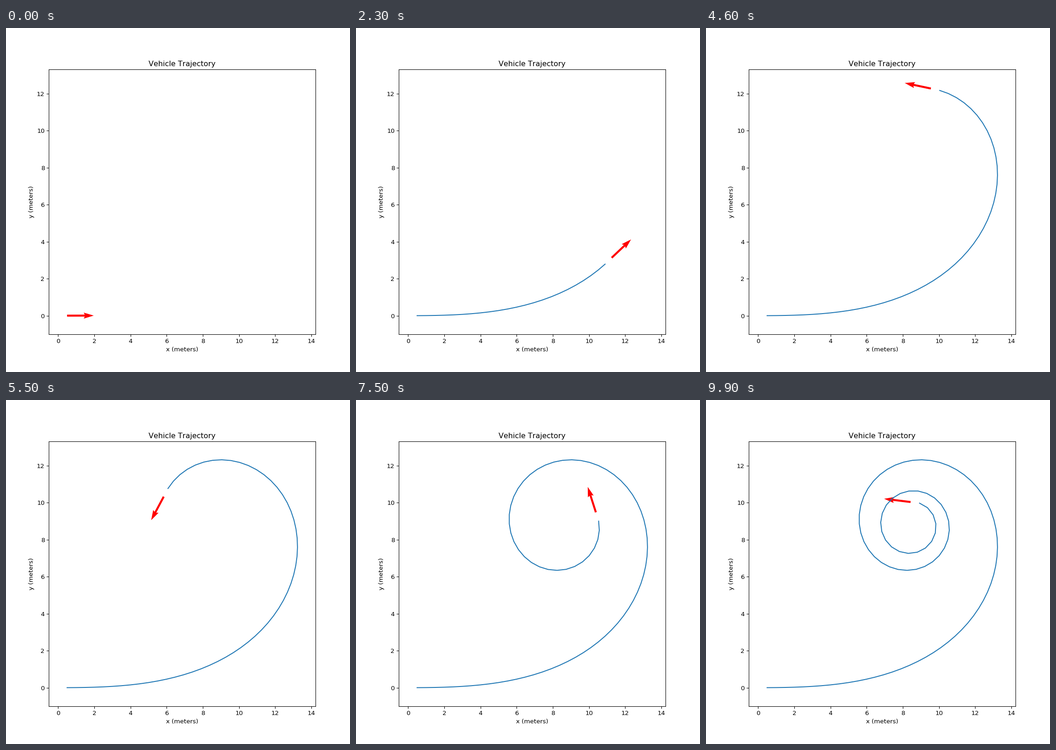
A matplotlib script that plays this animation: 748x748 px, repeating every 10 s.

```python
import numpy as np
import matplotlib.pyplot as plt
from matplotlib.animation import FuncAnimation

STEPS = 100
STRIDE = 0.5       # metres travelled per step
WHEELBASE = 2.0    # metres
STEER_RATE = 0.01  # radians per step
SIZE, DPI = 748, 96

# Bicycle model with steadily increasing steering angle
steer = STEER_RATE * np.arange(1, STEPS + 1)
heading = np.cumsum(STRIDE / WHEELBASE * np.tan(steer))
u, v = np.cos(heading), np.sin(heading)
x, y = np.cumsum(STRIDE * u), np.cumsum(STRIDE * v)

plt.rcParams.update({"font.family": "DejaVu Sans", "text.kerning_factor": 6})
fig, ax = plt.subplots(figsize=(SIZE / DPI, SIZE / DPI), dpi=DPI)
fig.subplots_adjust(left=0.1249)  # snaps the left spine to the lower pixel
ax.set_title("Vehicle Trajectory", pad=5)
ax.set_xlabel("x (meters)")
ax.set_ylabel("y (meters)")

path, = ax.plot([], [], color="#1f77b4", lw=1.5)
arrow = ax.quiver(x[:1], y[:1], u[:1], v[:1], color="red", scale=10)
ax.set_xlim(x.min() - 1, x.max() + 1)
ax.set_ylim(y.min() - 1, y.max() + 1)


def update(i):
    path.set_data(x[:i], y[:i])
    arrow.set_offsets([[x[i], y[i]]])
    arrow.set_UVC(u[i:i + 1], v[i:i + 1])
    return path, arrow


anim = FuncAnimation(fig, update, frames=STEPS, interval=100,
                     repeat=True, repeat_delay=0)
plt.show()
```
